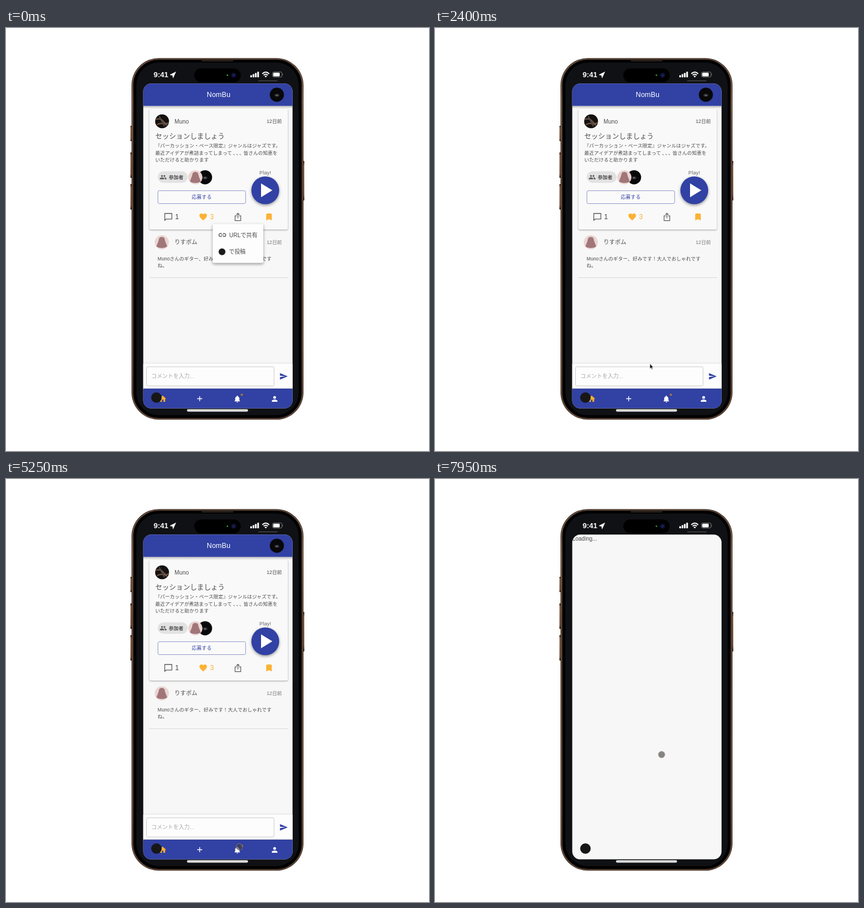
Write an HTML page that moves like this. It is 748 px wide and 748 px high and loops after 8000 ms.

```html
<!DOCTYPE html>
<html lang="ja">
<head>
<meta charset="utf-8">
<title>Session app</title>
<style>
html, body { margin: 0; width: 100%; height: 100%; overflow: hidden; background: #fff; }
svg { display: block; width: 100vw; height: 100vh; }
text { font-family: "Liberation Sans", "Noto Sans CJK JP", "Noto Sans CJK", sans-serif; fill: #4a4a4a; }
.body { font-size: 8.5px; letter-spacing: .1px; }
.name { font-size: 10px; letter-spacing: .1px; }
.num { font-size: 12px; }
.mid { text-anchor: middle; }
.lift { filter: drop-shadow(0 1px 1.3px rgba(0,0,0,.36)); }
.float { filter: drop-shadow(0 2px 2.5px rgba(0,0,0,.4)); }
.blue { fill: #3141a4; }
.gold { fill: #fbb233; }
.grey { fill: #5c5c5c; }
.white { fill: #fff; }
</style>
</head>
<body>
<svg viewBox="0 0 748 748" xmlns="http://www.w3.org/2000/svg">
  <defs>
    <linearGradient id="metal" x1="0" y1="0" x2="0" y2="1">
      <stop offset="0" stop-color="#6e5443"/><stop offset=".12" stop-color="#a17a61"/>
      <stop offset=".3" stop-color="#765643"/><stop offset=".8" stop-color="#8a6750"/>
      <stop offset="1" stop-color="#6a4c3a"/>
    </linearGradient>
    <linearGradient id="key" x1="0" y1="0" x2="0" y2="1">
      <stop offset="0" stop-color="#2c1e16"/><stop offset=".12" stop-color="#9c775d"/>
      <stop offset=".85" stop-color="#886650"/><stop offset="1" stop-color="#2c1e16"/>
    </linearGradient>
    <radialGradient id="glow">
      <stop offset="0" stop-color="#8b8b90"/><stop offset="1" stop-color="#0b0b0d" stop-opacity="0"/>
    </radialGradient>
    <linearGradient id="shade" x1="0" y1="0" x2="0" y2="1">
      <stop offset="0" stop-color="#000" stop-opacity=".26"/><stop offset="1" stop-color="#000" stop-opacity="0"/>
    </linearGradient>
    <clipPath id="screen"><rect x="242.7" y="98.3" width="264" height="574.3" rx="14"/></clipPath>
    <clipPath id="nav"><rect x="242" y="638" width="265" height="35"/></clipPath>
    <clipPath id="disc"><circle r="12.5"/></clipPath>
    <g id="bear">
      <circle r="12.5" fill="#ead5d3"/>
      <path clip-path="url(#disc)" d="M-5-6Q-4.5-9.5 0-9.5T5-6L6-2 9.5 7Q7 10 0 10T-9.5 7L-6-2Z" fill="#a17679"/>
    </g>
    <g id="night">
      <circle r="12.5" fill="#08080a"/><ellipse cy="1" rx="6.5" ry="4" fill="url(#glow)"/>
    </g>
  </defs>

  <!-- phone body -->
  <g fill="url(#key)">
    <rect x="219.8" y="173" width="5" height="27" rx="1.3"/>
    <rect x="219.8" y="220" width="5" height="45" rx="1.3"/>
    <rect x="219.8" y="276" width="5" height="45" rx="1.3"/>
    <rect x="523.5" y="235" width="4.1" height="70" rx="1.3"/>
  </g>
  <rect x="222" y="53.2" width="304" height="639.4" rx="48" fill="#32241b"/>
  <rect x="224" y="55" width="300" height="635.8" rx="46" fill="#070606" stroke="url(#metal)" stroke-width="1.6"/>
  <rect x="226.5" y="57.5" width="295" height="630.8" rx="43.5" fill="#000"/>
  <rect x="230.5" y="61" width="287.2" height="623.8" rx="40" fill="#101114"/>
  <rect x="346" y="57" width="56" height="2" rx="1" fill="#35281f"/>
  <rect x="333" y="71.5" width="82" height="24.5" rx="12.2" fill="#000"/>
  <circle cx="402.5" cy="83.5" r="4.2" fill="#10133d"/>
  <circle cx="402.5" cy="83.5" r="1.7" fill="#1c2468"/>
  <circle cx="391.5" cy="83.5" r="1.3" fill="#34b950"/>

  <!-- status bar -->
  <text x="261" y="87.3" font-size="13" font-weight="700" style="fill:#fff">9:41</text>
  <path class="white" d="M300.3 77.6 290 82.8l4.6.9.9 4.6Z" stroke="#fff" stroke-width=".6" stroke-linejoin="round"/>
  <g class="white">
    <rect x="432" y="83.4" width="3" height="3.8" rx=".7"/><rect x="436.1" y="81.6" width="3" height="5.6" rx=".7"/>
    <rect x="440.2" y="79.5" width="3" height="7.7" rx=".7"/><rect x="444.3" y="77.3" width="3" height="9.9" rx=".7"/>
  </g>
  <g fill="none" stroke="#fff" stroke-width="1.9">
    <path d="M453.2 81Q459.3 75.2 465.4 81M455.6 83.5Q459.3 80 463 83.5"/>
    <path class="white" stroke="none" d="M457.2 85.2Q459.3 83.5 461.4 85.2L459.3 87.5Z"/>
  </g>
  <rect x="471.2" y="77.7" width="17" height="9" rx="2.7" fill="none" stroke="#8b8b8b" stroke-width=".9"/>
  <rect x="472.5" y="79" width="11.5" height="6.4" rx="1.5" class="white"/>
  <path d="M489.2 80.6q1.5 1.5 0 3.2Z" fill="#8b8b8b"/>
  <rect x="446" y="92.8" width="34" height="1.3" fill="#4d4d50"/>
  <rect x="320" y="674" width="108" height="4.4" rx="2.2" fill="#d9d9d9"/>

  <g clip-path="url(#screen)">
    <rect x="242" y="98" width="266" height="576" fill="#f7f7f7"/>
    <g id="page">
      <rect x="242" y="137.5" width="266" height="5" fill="url(#shade)"/>
      <rect class="blue" x="242" y="98" width="266" height="39.7"/>
      <text class="mid" x="376" y="122" font-size="12.4" letter-spacing=".1" style="fill:#fff">NomBu</text>
      <use href="#night" x="479" y="118"/>

      <!-- post -->
      <rect class="lift" x="253.5" y="142.5" width="245" height="214" rx="3" fill="#f9f9f9"/>
      <g transform="translate(276 165)" clip-path="url(#disc)">
        <circle r="12.5" fill="#15110f"/>
        <path d="M-12-3Q-3-7 2 0T12 2M-9 6Q0 1 9 7" fill="none" stroke="#8c6a56" stroke-width="2.2" opacity=".75"/>
        <path d="M-5-9 4 9" stroke="#4d4a4b" stroke-width="2"/>
      </g>
      <text class="name" x="298" y="168.6">Muno</text>
      <text class="body" x="461" y="168.3">12日前</text>
      <text x="264" y="195.8" font-size="12.2" letter-spacing=".1">セッションしましょう</text>
      <g class="body">
        <text x="264" y="211.4">『パーカッション・ベース限定』ジャンルはジャズです。</text>
        <text x="264" y="223.7">最近アイデアが煮詰まってしまって</text>
        <text x="401.5 407 412.5" y="223.7">、、、</text>
        <text x="420" y="223.7">皆さんの知恵を</text>
        <text x="264" y="236">いただけると助かります</text>
      </g>
      <rect x="268.3" y="253.5" width="53" height="20.3" rx="10.1" fill="#e2e2e2"/>
      <path class="grey" transform="translate(278 263.8) scale(.54) translate(-12 -12)" d="M16 11a3 3 0 1 0 0-6 3 3 0 0 0 0 6ZM8 11A3 3 0 1 0 8 5a3 3 0 0 0 0 6ZM8 13c-2.3 0-7 1.2-7 3.5V19h14v-2.5C15 14.2 10.3 13 8 13ZM16 13l-1 .05c1.2.85 2 2 2 3.45V19h6v-2.5C23 14.2 18.3 13 16 13Z"/>
      <text class="body" x="288" y="266.6" font-weight="700">参加者</text>
      <use href="#night" x="352" y="264"/>
      <use href="#bear" x="334.8" y="264"/>
      <text x="448" y="258.8" font-size="9" letter-spacing=".2" style="fill:#666">Play!</text>
      <circle class="blue float" cx="458.5" cy="287" r="24.6"/>
      <path class="white" d="M451 274.8V299.2L471 287Z"/>
      <rect x="268.7" y="287.7" width="155" height="22.8" rx="2.5" fill="#fafafa" stroke="#858dc3" stroke-width=".9"/>
      <text class="mid" x="346.1" y="302" font-size="8.6" letter-spacing=".25" style="fill:#3141a4">応募する</text>

      <path d="M280.7 328H293.3V337.8H283.2L280.7 340.2Z" fill="none" stroke="#5c5c5c" stroke-width="1.3" stroke-linejoin="round"/>
      <text class="num" x="299" y="338.2">1</text>
      <path class="gold" transform="translate(348.7 334.2) scale(.67) translate(-12 -12.2)" d="M12 21.35 10.55 20.03C5.4 15.36 2 12.28 2 8.5 2 5.42 4.42 3 7.5 3c1.74 0 3.41.81 4.5 2.09C13.09 3.81 14.76 3 16.5 3 19.58 3 22 5.42 22 8.5c0 3.78-3.4 6.86-8.55 11.54Z"/>
      <text class="num" x="360.7" y="338.2" style="fill:#fbb233">3</text>
      <path d="M408 332H405.1V340.5H415.1V332H412.2M410.1 336.5V327.6M407.4 330.3 410.1 327.6 412.8 330.3" fill="none" stroke="#5c5c5c" stroke-width="1.25"/>
      <path class="gold" d="M460.2 329.5Q460.2 327.9 461.8 327.9H468.3Q469.9 327.9 469.9 329.5V340.2L465 338.1 460.2 340.2Z"/>

      <!-- reply -->
      <use href="#bear" x="275.5" y="379"/>
      <text class="name" x="298" y="382.3">りすポム</text>
      <text class="body" x="461" y="382.3" style="fill:#777">12日前</text>
      <text class="body" x="268" y="410.8">Muno</text>
      <text class="body" x="289.3" y="410.8">さんのギター、好みです！大人でおしゃれです</text>
      <text class="body" x="268" y="423.3">ね。</text>
      <path d="M253 441.5H499" stroke="#dadada"/>

      <!-- comment field -->
      <rect x="242" y="593.5" width="266" height="46" fill="#fdfdfd" style="filter:drop-shadow(0 -1px 1px rgba(0,0,0,.09))"/>
      <rect x="248.5" y="599" width="225.5" height="34" rx="2.3" fill="#fdfdfd" stroke="#c3c3c3" stroke-width=".9"/>
      <text x="257" y="619" font-size="9.7" style="fill:#aaa">コメントを入力...</text>
      <path class="blue" transform="translate(491 616) scale(.65) translate(-12 -12)" d="M2 21 23 12 2 3V10L17 12 2 14Z"/>

      <!-- tab bar -->
      <rect class="blue" x="242" y="638" width="266" height="35"/>
      <path d="M242 638H508" stroke="#23307c" stroke-width=".8"/>
      <circle id="ripple" cx="412" cy="655.5" clip-path="url(#nav)" fill="#fff"/>
      <path class="gold" d="M277 650 270.7 655.7H272.6V660.9H275.6V657.3H278.4V660.9H281.4V655.7H283.3Z"/>
      <path d="M338.1 655.5H346.9M342.5 651.1V659.9" stroke="#fff" stroke-width="1.3"/>
      <path class="white" transform="translate(409 656) scale(.62) translate(-12 -12)" d="M12 22a2 2 0 0 0 2-2h-4a2 2 0 0 0 2 2ZM18 16V11C18 7.93 16.36 5.36 13.5 4.68V4a1.5 1.5 0 0 0-3 0V4.68C7.63 5.36 6 7.92 6 11V16L4 18V19H20V18Z"/>
      <circle cx="417" cy="648.6" r="2" fill="#a9783f"/>
      <g class="white"><circle cx="475" cy="653.2" r="2.5"/><path d="M470 661V659.5C470 657.8 473.3 656.9 475 656.9S480 657.8 480 659.5V661Z"/></g>

      <!-- share menu -->
      <g id="menu">
        <rect class="float" x="365.5" y="346.5" width="89.5" height="69" rx="2.5" fill="#fdfdfd"/>
        <path d="M381.6 363.4H379.2A2.6 2.6 0 0 0 379.2 368.6H381.6M383.6 363.4H386A2.6 2.6 0 0 1 386 368.6H383.6M380 366H385.2" fill="none" stroke="#444" stroke-width="1.2"/>
        <text x="394.7" y="369.5" font-size="10">URLで共有</text>
        <circle cx="382" cy="395.7" r="6" fill="#1b1b1b"/>
        <text x="394" y="399.2" font-size="9.9">で投稿</text>
      </g>
    </g>
    <text id="loading" x="242.7" y="108.5" font-size="10">Loading...</text>
    <circle cx="266" cy="653.5" r="9.3" fill="#171717"/>
    <path id="arrow" d="M0 0V9.2L2.1 7.3 3.4 10.4 4.9 9.7 3.6 6.8H6.3Z" fill="#0a0a0a" stroke="#fff" stroke-width=".7"/>
    <circle id="touch" r="5.8" fill="#404040" fill-opacity=".62" stroke="#a39879" stroke-width=".6"/>
  </g>
</svg>
<script>
const LOOP = 8000, STEP = 50;
const $ = id => document.getElementById(id);
const page = $('page'), menu = $('menu'), loading = $('loading');
const arrow = $('arrow'), touch = $('touch'), ripple = $('ripple');

// pointer stops: time, x, y
const arrowPath = [[700, 340, 503], [1100, 295, 550.7], [1950, 295, 550.7], [2400, 380, 593.5], [2700, 411, 648]];
const touchPath = [[2700, 412.5, 650.5], [6600, 412.5, 650.5], [6950, 405, 514], [7100, 405, 514], [7350, 400.7, 487.3]];

const part = (t, from, to) => Math.min(1, Math.max(0, (t - from) / (to - from)));
const ease = k => k * k * (3 - 2 * k);
const show = (el, on) => el.setAttribute('visibility', on ? 'visible' : 'hidden');

function place(el, path, t) {
  let [, x, y] = path[0];
  for (let i = 1; i < path.length; i++) {
    const k = ease(part(t, path[i - 1][0], path[i][0]));
    x += (path[i][1] - path[i - 1][1]) * k;
    y += (path[i][2] - path[i - 1][2]) * k;
  }
  el.setAttribute('transform', `translate(${x} ${y})`);
}

function draw(t) {
  const busy = t >= 7850;
  page.style.display = busy ? 'none' : '';
  show(loading, busy);

  const shut = ease(part(t, 1350, 1550));
  const size = 1 - shut * .25;
  menu.setAttribute('opacity', 1 - shut);
  menu.setAttribute('transform', `translate(410 347) scale(${size}) translate(-410 -347)`);

  place(arrow, arrowPath, t);
  place(touch, touchPath, t);
  show(arrow, t >= 700 && t < 2700);
  show(touch, t >= 2700);

  const grow = ease(part(t, 3650, 4150));
  ripple.setAttribute('r', 30 * grow);
  ripple.setAttribute('opacity', .2 * part(t, 3650, 3750) * (1 - part(t, 4000, 4400)));
}

function tick() {
  const t = performance.now() % LOOP;
  draw(Math.floor(t / STEP) * STEP);
  requestAnimationFrame(tick);
}
tick();
</script>
</body>
</html>
```
